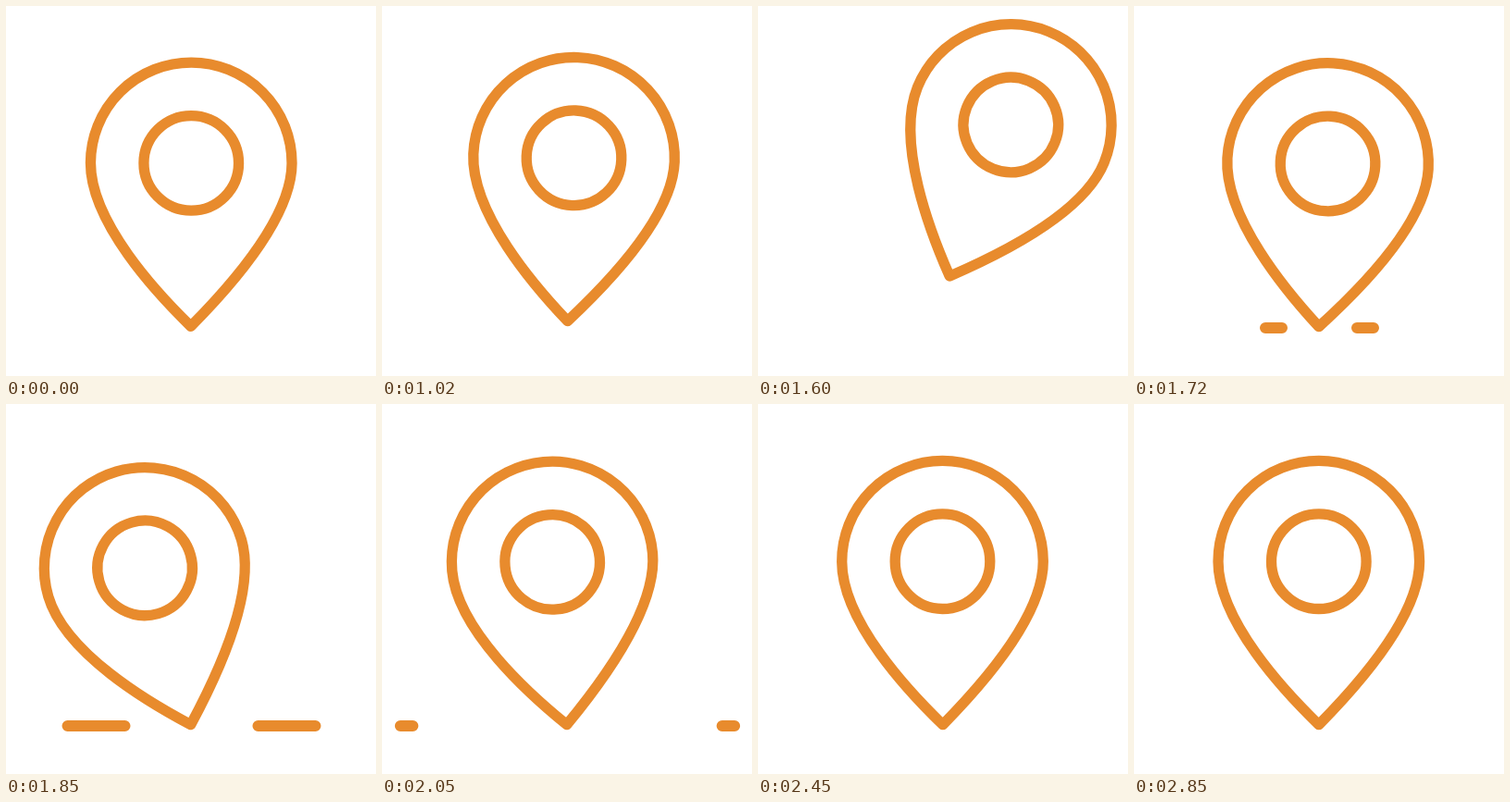
Write an HTML page that moves like this. It is 400 by 400 pixels and loops after 2.87 s.

```html
<!DOCTYPE html>
<html>
<head>
<meta charset="utf-8">
<style>
html, body { margin: 0; width: 100%; height: 100%; overflow: hidden; background: #fff; }
svg { display: block; width: 100vw; height: 100vh; }
</style>
</head>
<body>
<svg viewBox="0 0 400 400" fill="none" stroke="#e88b2d" stroke-width="11.3" stroke-linecap="round" stroke-linejoin="round">
  <!-- The pin's tip is its local origin -->
  <g id="pin">
    <path d="M0 0C-36 -35 -108.8 -112 -108.8 -176.5A108.8 108.8 0 0 1 108.8 -176.5C108.8 -114 34.5 -35 0 0Z"/>
    <circle cy="-176.5" r="51.3"/>
  </g>
  <path id="dust" stroke-width="12"/>
</svg>
<script>
const LOOP = 2870, HOLD = 995;
const JUMP = 988, PEAK = 1535, LAND = 1690;
const pin = document.getElementById('pin');
const dust = document.getElementById('dust');

// Pendulum turning points: [time, degrees]
const swings = [[1550, 24.6], [1890, -17.9], [2220, 8.7], [2580, -3.75], [2850, 0]];

const part = (t, a, b) => Math.min(1, Math.max(0, (t - a) / (b - a)));
const mix = (a, b, p) => a + (b - a) * p;
const smooth = p => p * p * (3 - 2 * p);
const easeOut = p => 1 - (1 - p) ** 4;

// Cubic Bezier easing (.1, 0, .2, 1), solved by bisection
function launch(x) {
  let lo = 0, hi = 1;
  for (let i = 0; i < 24; i++) {
    const s = (lo + hi) / 2, r = 1 - s;
    if (.3 * s * r * r + .6 * s * s * r + s ** 3 < x) lo = s; else hi = s;
  }
  return smooth(lo);
}

function angleAt(t) {
  if (t < swings[0][0]) return swings[0][1] * launch(part(t, JUMP, PEAK));
  for (let i = 1; i < swings.length; i++) {
    const [t0, a] = swings[i - 1], [t1, b] = swings[i];
    if (t < t1) return mix(a, b, smooth(part(t, t0, t1)));
  }
  return 0;
}

function draw(now) {
  const time = now % LOOP;
  const t = time < 1020 ? HOLD : time;
  const lift = t < PEAK ? launch(part(t, JUMP, PEAK)) : 1 - part(t, PEAK, LAND) ** 2;
  pin.setAttribute('transform',
    `translate(${199.8 + 9 * lift} ${346.7 - 66.7 * lift}) rotate(${angleAt(t)})`);

  const head = mix(160, 11, easeOut(part(t, 1699, 2394)));
  const tail = mix(160, 11, easeOut(part(t, 1815, 2440)));
  const shown = t > 1699 && t < 2300;
  dust.setAttribute('d', shown
    ? `M${tail} 348H${head}M${401 - tail} 348H${401 - head}` : '');
  requestAnimationFrame(() => draw(performance.now() - start));
}

const start = performance.now();
draw(0);
</script>
</body>
</html>
```
